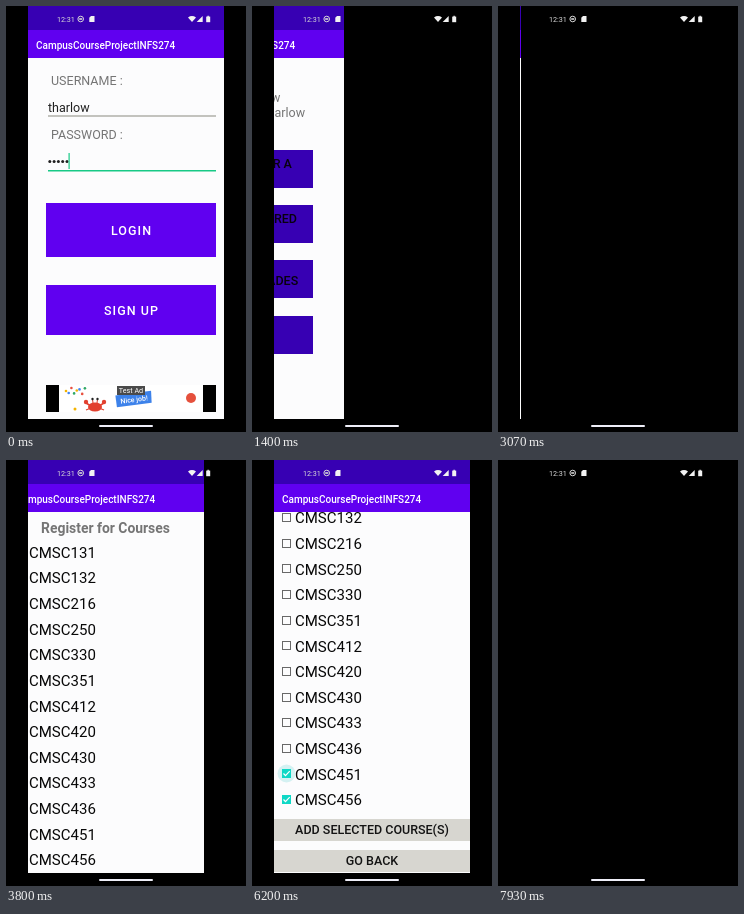
An HTML page with a canvas for the animation above (8000 ms loop, 240 by 426 pixels).

```html
<!DOCTYPE html>
<html lang="en">
<head>
<meta charset="utf-8">
<title>Course registration app</title>
<style>
  html, body { margin: 0; width: 100%; height: 100%; overflow: hidden; background: #000; }
  canvas { display: block; width: 240px; height: 426px; }
</style>
</head>
<body>
<canvas id="stage"></canvas>
<script>
const W = 240, H = 426, LOOP = 8000, STEP = 1000 / 15;
const LEFT = 22, WIDTH = 196, BOTTOM = 413, BAR = 52;
const SLIDE = 1000, MENU_AT = 990, LIST_AT = 3003, BACK_AT = 7920;
const PURPLE = '#6000f0', INDIGO = '#3700b3', TEAL = '#0fd8c6', GREY = '#757575', PAPER = '#fcfcfd';
const APP = 'CampusCourseProjectINFS274';
const COURSES = [131, 132, 216, 250, 330, 351, 412, 420, 430, 433, 436, 451, 456];
const CHECKED_AT = { 456: 5500, 451: 6070 };

const canvas = document.getElementById('stage');
const ctx = canvas.getContext('2d');
const ratio = window.devicePixelRatio || 1;
canvas.width = W * ratio;
canvas.height = H * ratio;

const clamp = v => Math.max(0, Math.min(1, v));
const ease = p => 0.5 - 0.5 * Math.cos(Math.PI * clamp(p));

function rect(x, y, w, h, color) {
  ctx.fillStyle = color;
  ctx.fillRect(x, y, w, h);
}

function disc(x, y, r, color) {
  ctx.fillStyle = color;
  ctx.beginPath();
  ctx.arc(x, y, r, 0, 7);
  ctx.fill();
}

function shape(points, color) {
  ctx.fillStyle = color;
  ctx.beginPath();
  points.forEach(([x, y]) => ctx.lineTo(x, y));
  ctx.fill();
}

function line(points, color, width) {
  ctx.strokeStyle = color;
  ctx.lineWidth = width;
  ctx.beginPath();
  points.forEach(([x, y]) => ctx.lineTo(x, y));
  ctx.stroke();
}

// y is the middle of the capital letters
function text(str, x, y, size, color, { weight = 400, align = 'left', spacing = 0 } = {}) {
  ctx.font = `${weight} ${size}px Roboto, sans-serif`;
  ctx.letterSpacing = spacing + 'px';
  ctx.textAlign = align;
  ctx.fillStyle = color;
  ctx.fillText(str, x, y + size * 0.355);
}

function button(x, y, w, h, fill, color, lines, { spacing = 0, drop = 0.8 } = {}) {
  rect(x, y, w, h, fill);
  lines.forEach((str, i) => {
    const cy = y + h / 2 + drop + (i - (lines.length - 1) / 2) * 14.2;
    text(str, x + w / 2 + spacing / 2, cy, 12.5, color, { weight: 500, align: 'center', spacing });
  });
}

function appBar() {
  rect(LEFT, 0, WIDTH, 24, INDIGO);
  rect(LEFT, 24, WIDTH, BAR - 24, PURPLE);
  text(APP, 30, 39, 10, '#fff', { weight: 500 });
}

function crab(x, y) {
  const red = '#e2402f';
  for (const s of [-1, 1]) {
    line([[x + s * 4, y], [x + s * 9, y - 3]], red, 1.5);
    line([[x + s * 4, y + 2], [x + s * 9, y + 4]], red, 1.2);
    disc(x + s * 9, y - 4, 2.2, red);
    line([[x + s * 2, y - 3], [x + s * 2.5, y - 7]], red, 1);
  }
  ctx.fillStyle = red;
  ctx.beginPath();
  ctx.ellipse(x, y + 1, 7, 4.5, 0, 0, 7);
  ctx.fill();
  disc(x - 2.5, y - 7, 1.2, '#222');
  disc(x + 2.5, y - 7, 1.2, '#222');
}

function ad() {
  rect(40, 379, 170, 27, '#000');
  rect(53, 379, 144, 27, '#fff');
  ctx.save();
  ctx.beginPath();
  ctx.rect(53, 379, 144, 27);
  ctx.clip();
  const bits = ['#f4b400', '#4285f4', '#e8503f', '#2fa866'];
  for (let i = 0; i < 8; i++) {
    disc(60 + i * 2.7, 385 + 3 * Math.sin(i * 2.4), 1.3, bits[i % 4]);
  }
  disc(69, 403, 1.5, '#f4b400');
  crab(89, 400);
  ctx.save();
  ctx.translate(128, 393);
  ctx.rotate(-0.13);
  shape([[-18, -6], [18, -6], [17, 6], [-18, 6]], '#3d82ea');
  text('Nice job!', 0, 0.5, 7, '#fff', { weight: 500, align: 'center' });
  ctx.restore();
  rect(111, 380, 28, 9, '#4a4a4a');
  text('Test Ad', 125, 384.7, 7.2, '#fff', { align: 'center' });
  disc(185, 392, 5, '#e5503c');
  ctx.restore();
}

function login(t) {
  text('USERNAME :', 45, 75, 12.5, GREY);
  text('tharlow', 42, 101.7, 12.5, '#202020');
  rect(42, 109.5, 168, 1, '#8c8c80');
  text('PASSWORD :', 45, 129, 12.5, GREY);
  for (let i = 0; i < 5; i++) disc(43.8 + i * 4.3, 155.5, 1.5, '#202020');
  if (t % 1000 < 500) rect(62.5, 147, 1.2, 16, '#18c986');
  rect(42, 164, 168, 1.5, '#18c986');
  button(40, 197, 170, 54, PURPLE, '#fff', ['LOGIN'], { spacing: 1.05 });
  button(40, 279, 170, 50, PURPLE, '#fff', ['SIGN UP'], { spacing: 1.05 });
  ad();
}

function menu() {
  ['Logged In User', 'UID: 51760943', 'Username: tharlow', 'Full Name: Tina Harlow']
    .forEach((str, i) => text(str, 50, 62.3 + i * 14.6, 12.5, GREY));
  [['REGISTER FOR A', 'COURSE'], ['VIEW REGISTERED', 'COURSES'], ['SEE YOUR GRADES'], ['LOG OUT']]
    .forEach((lines, i) => {
      button(50, Math.round(143.6 + i * 55.4), 137, 38, INDIGO, '#08000f', lines, { drop: 1.6 });
    });
}

function checkbox(x, y, since) {
  if (since >= 0 && since < 330) {
    ctx.globalAlpha = 1 - clamp((since - 160) / 170);
    disc(x, y, 4 + 5 * clamp(since / 120), '#d4f1f2');
    ctx.globalAlpha = 1;
  }
  if (since < 0) {
    ctx.strokeStyle = '#686868';
    ctx.lineWidth = 1;
    ctx.strokeRect(x - 4, y - 4, 8, 8);
    return;
  }
  rect(x - 4.5, y - 4.5, 9, 9, TEAL);
  line([[x - 3, y], [x - 1, y + 2.2], [x + 3.2, y - 2.4]], '#fff', 1.2);
}

function list(t) {
  ctx.save();
  ctx.beginPath();
  ctx.rect(LEFT, BAR, WIDTH, BOTTOM - BAR);
  ctx.clip();
  ctx.translate(0, -60 * ease((t - 4300) / 500));
  text('Register for Courses', 119.5, 68.3, 13.9, GREY, { weight: 700, align: 'center' });
  COURSES.forEach((num, i) => {
    const y = 92.3 + i * 25.65;
    const at = CHECKED_AT[num];
    checkbox(34.5, Math.round(y) - 0.5, at ? t - at : -1);
    text('CMSC' + num, 43, y, 15, '#080808');
  });
  const style = ['#d7d6d0', '#141414'];
  button(LEFT, 419, WIDTH, 22, ...style, ['ADD SELECTED COURSE(S)'], { drop: -0.6 });
  button(LEFT, 450, WIDTH, 22, ...style, ['GO BACK'], { drop: -0.1 });
  ctx.restore();
}

// Each page slides in from the left over black
function page(draw, t, start) {
  const dx = start === null ? 0 : Math.floor(-WIDTH * (1 - ease((t - start) / SLIDE)));
  ctx.save();
  ctx.beginPath();
  ctx.rect(LEFT, 0, WIDTH, BOTTOM);
  ctx.clip();
  ctx.translate(dx, 0);
  rect(LEFT, 0, WIDTH, BOTTOM, PAPER);
  draw(t);
  appBar();
  ctx.restore();
}

function systemBars() {
  const ink = '#f2f2f2', dim = '#d8d8d8';
  text('12:31', 51, 13.2, 7.2, dim);
  ctx.strokeStyle = dim;
  ctx.lineWidth = 1;
  ctx.beginPath();
  ctx.arc(74.7, 13, 2.8, 0, 7);
  ctx.stroke();
  rect(73.2, 12.2, 3, 1.6, dim);
  shape([[85, 10], [88.5, 10], [88.5, 16], [83.3, 16], [83.3, 11.8]], ink);
  ctx.fillStyle = ink;
  ctx.beginPath();
  ctx.moveTo(186, 16);
  ctx.lineTo(182, 11.4);
  ctx.quadraticCurveTo(186, 8.6, 190, 11.4);
  ctx.fill();
  shape([[196.7, 10], [196.7, 16], [190.7, 16]], ink);
  rect(200.2, 10.6, 4, 5.6, ink);
  rect(201.3, 9.8, 1.8, 1, ink);
  ctx.fillStyle = '#eeeef8';
  ctx.beginPath();
  ctx.roundRect(93, 419, 54, 2, 1);
  ctx.fill();
}

function render(t) {
  ctx.setTransform(ratio, 0, 0, ratio, 0, 0);
  rect(0, 0, W, H, '#000');
  if (t < MENU_AT) page(login, t, null);
  else if (t < LIST_AT) page(menu, t, MENU_AT);
  else if (t < BACK_AT) page(list, t, LIST_AT);
  else page(menu, t, BACK_AT);
  systemBars();
}

const began = performance.now();
function tick() {
  const t = (performance.now() - began) % LOOP;
  render(Math.floor((t + 4) / STEP) * STEP % LOOP);
  requestAnimationFrame(tick);
}
tick();
</script>
</body>
</html>
```
